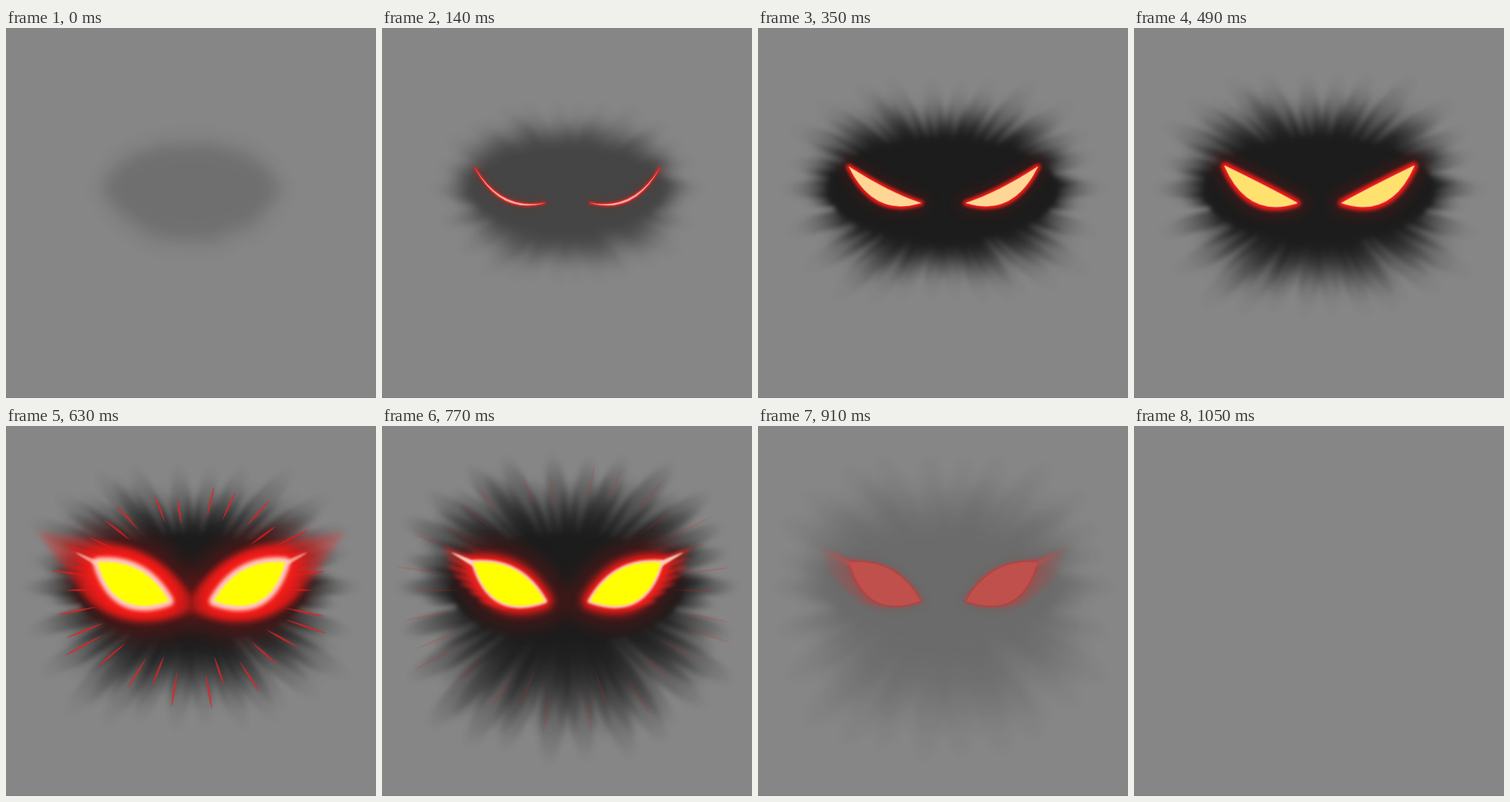
Recreate the animation shown at these times as an HTML page with a canvas. Size 480 by 480 pixels, loop 2050 ms.

```html
<!DOCTYPE html>
<html lang="en">
<head>
<meta charset="utf-8">
<title>Burning eyes</title>
<style>
  html, body { margin: 0; width: 100%; height: 100%; overflow: hidden; background: #868686; }
  canvas { display: block; width: 480px; height: 480px; }
</style>
</head>
<body>
<canvas id="stage" width="480" height="480"></canvas>
<script>
const SIZE = 480, STEP = 70, LOOP = 2050, LAST = 15;
const CX = 240, CY = 210;
const PLUMES = 26, SPARKS = 30, WISPS = 7;
const makeLayer = () => Object.assign(document.createElement('canvas'), { width: SIZE, height: SIZE }).getContext('2d');
const stage = document.getElementById('stage').getContext('2d');
const smoke = makeLayer(), fire = makeLayer();

const lerp = (a, b, t) => a + (b - a) * t;
const mix = (a, b, t) => a.map((v, i) => lerp(v, b[i], t));
const rgb = c => `rgb(${c.map(Math.round)})`;

// Repeatable noise in 0..1.
function noise(n) {
  const v = Math.sin(n * 12.9898 + 4.1) * 43758.5453;
  return v - Math.floor(v);
}

// Piecewise linear track; every key is [step, ...values].
function track(k, ...keys) {
  const n = keys.findIndex(key => key[0] >= k);
  if (n < 0) return keys[keys.length - 1].slice(1);
  if (n === 0) return keys[0].slice(1);
  const a = keys[n - 1], b = keys[n];
  return mix(a.slice(1), b.slice(1), (k - a[0]) / (b[0] - a[0]));
}

// Point on an oval whose upper and lower halves differ in height.
function ovalPoint(angle, side, up, down, scale) {
  const s = Math.sin(angle);
  return [CX + Math.cos(angle) * side * scale, CY + s * (s < 0 ? up : down) * scale];
}

// Leaf from a to b; belly sets how wide it stays towards the tip.
function leaf(c, [ax, ay], [bx, by], width, bulge, belly) {
  const dx = bx - ax, dy = by - ay, len = Math.hypot(dx, dy) || 1;
  const at = (t, w) => [ax + dx * t - dy / len * w, ay + dy * t + dx / len * w];
  c.beginPath();
  c.moveTo(...at(0, width));
  c.bezierCurveTo(...at(.45, bulge), ...at(.9, bulge * belly), bx, by);
  c.bezierCurveTo(...at(.9, -bulge * belly), ...at(.45, -bulge), ...at(0, -width));
  c.fill();
}

function drawPlume(angle, reach, core, spread, falloff) {
  const [rx, ry] = core, [side, up, down] = spread;
  const far = ovalPoint(angle, 215, 172, 224, reach * (1 + .12 * Math.sin(2 * angle) ** 2));
  const dx = far[0] - CX, dy = far[1] - CY;
  const q = 1 / Math.hypot(dx / rx, dy / ry);
  const edge = [CX + dx * q, CY + dy * q];
  const root = mix([CX, CY], edge, .88);
  const grow = lerp(dy < 0 ? up : down, side, dx * dx / (dx * dx + dy * dy));
  const tip = mix(edge, far, grow);
  const len = Math.hypot(tip[0] - edge[0], tip[1] - edge[1]);
  const shade = smoke.createLinearGradient(...edge, ...tip);
  for (let t = 0; t <= 1; t += .2) shade.addColorStop(t, `rgba(28,28,28,${.85 * (1 - t) ** falloff})`);
  smoke.fillStyle = shade;
  leaf(smoke, root, tip, 9, 6 + len * .11, .8);
}

function drawSmoke(k) {
  const core = track(k, [0, 104, 44], [2, 128, 55], [5, 150, 68], [11, 152, 72]);
  const spread = track(k, [0, .25, .28, .25], [2, .55, .52, .4], [5, .9, .75, .48], [9, .98, .87, .72], [11, 1, 1, 1]);
  const [falloff] = track(k, [0, 1.6], [5, 2.2], [9, 1.6], [11, 1.15]);
  smoke.clearRect(0, 0, SIZE, SIZE);
  for (let i = 0; i < PLUMES * 2; i++) {
    const angle = (i + (noise(i) - .5) * .7) * Math.PI / PLUMES;
    const reach = (i % 2 ? .84 : .97) + noise(i + 90) * .1;
    drawPlume(angle, reach, core, spread, falloff);
  }
  smoke.fillStyle = '#1c1c1c';
  smoke.beginPath();
  smoke.ellipse(CX, CY, ...core, 0, 0, 7);
  smoke.fill();
}

// Two lids, each one curve between the outer tip and the inner corner.
function eyePath(k) {
  const [tx, ty, ux, uy, lx, ly] = track(k,
    [2, 121, 182, 154, 237, 154, 243],
    [5, 118, 180, 171, 214, 150, 246],
    [8, 118, 179, 174, 202, 147, 248],
    [9, 119, 177, 180, 172, 140, 252]);
  const path = new Path2D();
  path.moveTo(tx, ty);
  path.quadraticCurveTo(ux, uy, 211, 227);
  path.quadraticCurveTo(lx, ly, tx, ty);
  path.closePath();
  return path;
}

function drawWing(alpha) {
  const heat = fire.createRadialGradient(168, 206, 20, 168, 206, 148);
  heat.addColorStop(0, 'rgba(255,30,25,1)');
  heat.addColorStop(.28, 'rgba(250,32,28,.85)');
  heat.addColorStop(.55, 'rgba(225,45,42,.55)');
  heat.addColorStop(1, 'rgba(205,55,52,.35)');
  fire.globalAlpha = alpha;
  fire.filter = 'blur(4px)';
  fire.fillStyle = heat;
  fire.beginPath();
  fire.moveTo(240, 222);
  fire.bezierCurveTo(218, 186, 184, 164, 150, 156);
  fire.lineTo(40, 137);
  fire.quadraticCurveTo(78, 185, 98, 216);
  fire.bezierCurveTo(126, 254, 190, 262, 240, 240);
  fire.fill();
  fire.globalAlpha = 1;
}

function drawWisps(alpha, tint) {
  fire.globalAlpha = alpha * .75;
  fire.filter = 'blur(2.5px)';
  fire.fillStyle = '#f52420';
  for (let i = 0; i < WISPS; i++) {
    const t = i / (WISPS - 1);
    const root = [lerp(142, 164, t * t), lerp(185, 232, t)];
    const tip = [root[0] - lerp(60, 38, t) - 10 * noise(i), root[1] - lerp(26, 6, t)];
    leaf(fire, root, tip, 6, 5, .5);
  }
  fire.globalAlpha = alpha;
  fire.filter = 'blur(1px)';
  fire.fillStyle = tint;
  leaf(fire, [136, 187], [90, 164], 5, 3, .5);
  fire.globalAlpha = 1;
}

function drawEye(k) {
  const path = eyePath(k);
  const [glow] = track(k, [1, .1], [2, .11], [5, .25], [8, .4], [9, 1], [11, .7], [13, .14]);
  const [flame] = track(k, [8, 0], [9, .7], [10, 1], [11, 1], [13, .5]);
  const color = track(k, [2, 255, 180, 170], [5, 255, 214, 150], [8, 255, 232, 90], [9, 255, 255, 0],
    [11, 255, 255, 0], [13, 255, 60, 54]);
  const rim = rgb(track(k, [2, 255, 70, 60], [5, 255, 150, 110], [9, 255, 205, 190], [11, 255, 205, 190], [13, 255, 60, 54]));
  const ring = (width, blur, style) => {
    fire.filter = `blur(${blur}px)`;
    fire.lineWidth = width;
    fire.strokeStyle = style;
    fire.stroke(path);
  };
  fire.lineJoin = 'round';
  ring(76 * glow + 8, 4 + 9 * glow, `rgba(190,15,15,${.06 + glow * .22})`);
  ring(30 * glow, .4 + 7 * glow, '#fa1c18');
  if (flame) drawWisps(flame, rim);
  ring(13 * glow * glow, .3 + 2.5 * glow * glow, rim);
  fire.filter = `blur(${.4 + glow * .8}px)`;
  fire.fillStyle = rgb(color);
  fire.fill(path);
}

function drawSparks(k) {
  const [scale, alpha] = track(k, [9, 1, .75], [11, 1.22, .16], [12, 1.3, 0]);
  fire.filter = 'blur(.7px)';
  fire.globalAlpha = alpha;
  fire.fillStyle = '#e02424';
  for (let i = 0; i < SPARKS; i++) {
    const angle = (i + (noise(i + 40) - .5) * .5) * 2 * Math.PI / SPARKS;
    const reach = scale * (.88 + noise(i + 70) * .22);
    const at = s => ovalPoint(angle, 178, 122, 146, reach * s);
    leaf(fire, at(.7), at(1), 0, 2.4, .5);
  }
  fire.globalAlpha = 1;
}

function bothSides(draw) {
  draw();
  fire.save();
  fire.setTransform(-1, 0, 0, 1, 481, 0);
  draw();
  fire.restore();
}

function drawFire(k) {
  fire.clearRect(0, 0, SIZE, SIZE);
  const [wing] = track(k, [8, 0], [9, 1], [10, .35], [11, 0]);
  if (wing) bothSides(() => drawWing(wing));
  if (k >= 9 && k < 12) drawSparks(k);
  bothSides(() => drawEye(k));
}

function render(k) {
  stage.fillStyle = '#868686';
  stage.fillRect(0, 0, SIZE, SIZE);
  stage.fillStyle = '#827c80';
  stage.fillRect(0, 479, SIZE, 1);
  if (k === LAST) return;

  drawSmoke(k);
  const [blur] = track(k, [0, 9], [2, 5], [5, 3], [11, 3.5], [13, 6]);
  stage.filter = `blur(${blur}px)`;
  stage.globalAlpha = track(k, [0, .21], [4, 1], [11, 1], [13, .25], [14, .1])[0];
  stage.drawImage(smoke.canvas, 0, 0);
  stage.filter = 'none';

  if (k > 0) {
    drawFire(k);
    stage.globalAlpha = track(k, [1, .5], [2, .9], [3, 1], [11, 1], [13, .57], [14, .25])[0];
    stage.drawImage(fire.canvas, 0, 0);
  }
  stage.globalAlpha = 1;
}

let shown = -1;
function tick() {
  const k = Math.min(LAST, Math.floor(performance.now() % LOOP / STEP));
  if (k !== shown) render(shown = k);
  requestAnimationFrame(tick);
}
tick();
</script>
</body>
</html>
```
